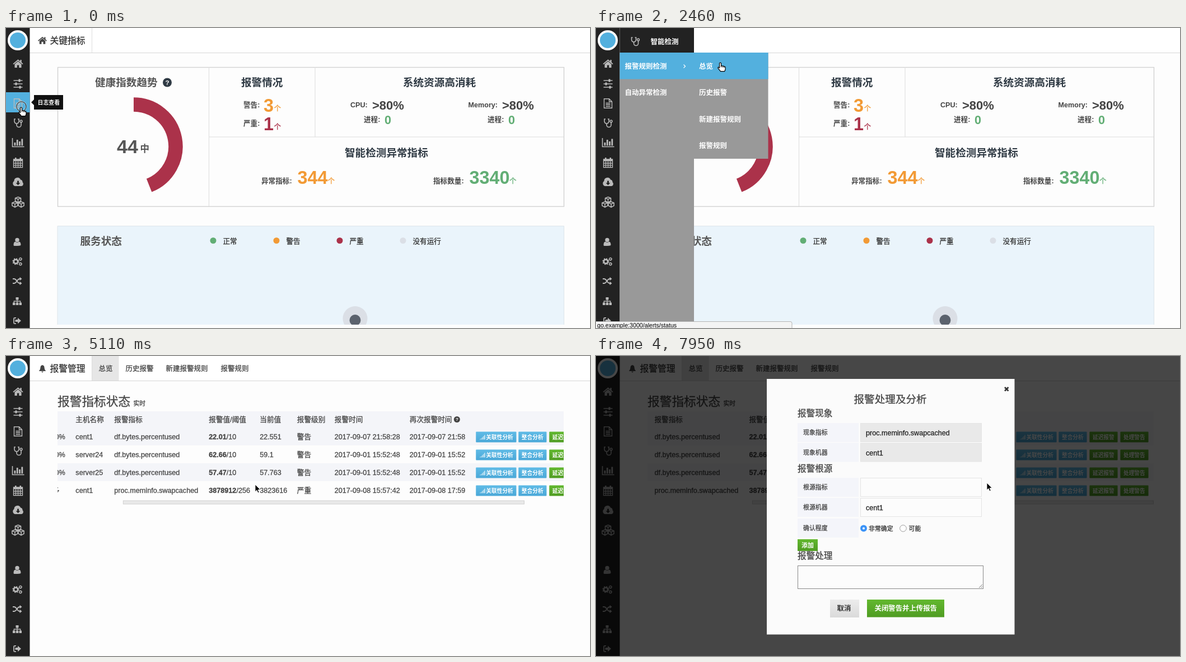
Animation, 1043 px wide and 537 px high, one loop 8 s. Source, as an HTML page:

```html
<!DOCTYPE html>
<html lang="zh-CN">
<head>
<meta charset="utf-8">
<title>报警管理</title>
<style>
html, body { margin: 0; width: 100%; height: 100%; overflow: hidden; background: #fdfdfd; }
svg { display: block; width: 1043px; height: 537px; }
text { font-family: "Liberation Sans", "Noto Sans CJK SC", "Noto Sans CJK", sans-serif; white-space: pre; }
</style>
</head>
<body>
<svg id="stage" viewBox="0 0 1043 537" xmlns="http://www.w3.org/2000/svg"></svg>
<script>
const BLUE = '#53b0de', GREEN = '#62ae75', ORANGE = '#f29a35', RED = '#ab324a', DARK = '#2f3a44', INK = '#444';
const LOOP = 8000, SCROLL = 237, THUMB = 187;

// drawing helpers; text is placed by its left edge and its middle line
const text = (x, y, size, str, fill = INK, weight = 400) =>
  `<text x="${x}" y="${y + size * .37}" font-size="${size}" fill="${fill}" font-weight="${weight}"` +
  `${weight < 700 ? ` stroke="${fill}" stroke-width=".28"` : ''}>${str}</text>`;
const bold = (x, y, size, str, fill = INK) => text(x, y, size, str, fill, 700);
const rect = (x, y, w, h, fill, extra = '') =>
  `<rect x="${x}" y="${y}" width="${w}" height="${h}" fill="${fill}" ${extra}/>`;
const dot = (x, y, r, fill, extra = '') => `<circle cx="${x}" cy="${y}" r="${r}" fill="${fill}" ${extra}/>`;
const fill = d => `<path d="${d}" fill="currentColor"/>`;
const line = (d, w = 1.6) => `<path d="${d}" fill="none" stroke="currentColor" stroke-width="${w}"/>`;
const group = (id, body) => `<g id="${id}">${body}</g>`;
const border = c => `stroke="${c}"`;

const cube = (x, y) =>
  `<g transform="translate(${x} ${y})">${line('M0-5L5-3V2L0 5L-5 2V-3ZM-5-3L0-1L5-3M0-1V5', 1.5)}</g>`;
const cog = (x, y, r) =>
  `<g fill="none" stroke="currentColor"><circle cx="${x}" cy="${y}" r="${r}" stroke-width="${r * .7}"/>` +
  `<circle cx="${x}" cy="${y}" r="${r * 1.45}" stroke-width="${r * .5}" stroke-dasharray="${r * .57}"/></g>`;

const ICONS = {
  home: fill('M0-4.3L6 .8V7H1.7V2.5H-1.7V7H-6V.8ZM3.8-7H6.2V-1L3.8-3Z') + line('M-8.5 .6L0-6.5L8.5 .6', 1.8),
  sliders: line('M-8-6H8M-8 0H8M-8 6H8', 1.7) + fill('M1-8.5H4V-3.5H1ZM-5-2.5H-2V2.5H-5ZM2 3.5H5V8.5H2Z'),
  file: line('M-7-8.2H2L7-3.2V8.2H-7ZM2-8.2V-3.2H7M-4 -.5H4M-4 2.3H4M-4 5.2H4', 1.4),
  scope: line('M-4.5-7H-6.5V-3A4 4 0 0 0 1.5-3V-7H-.5M-2.5 1V3.5A4 4 0 0 0 5.5 3.5V-1') +
    dot(5.5, -3, 1.9, 'none', 'stroke="currentColor" stroke-width="1.5"'),
  chart: line('M-10-8V7.5H11', 1.6) + fill('M-7 5.5V0H-4.2V5.5ZM-2.7 5.5V-5H.1V5.5ZM1.6 5.5V-2H4.4V5.5ZM5.9 5.5V-6.5H8.7V5.5Z'),
  calendar: line('M-8-6H8V8.5H-8ZM-8 1H8M-8 4.7H8M-4-2.5V8M0-2.5V8M4-2.5V8', 1.3) +
    fill('M-8-6H8V-2.5H-8ZM-5.5-9H-3V-5H-5.5ZM3-9H5.5V-5H3Z'),
  cloud: fill('M-5.5 7A5 5 0 0 1-7-2A6 6 0 0 1 4.5-4.5A4 4 0 0 1 8 0A4 4 0 0 1 6 7Z') +
    '<path d="M-1.4-2.5H1.4V1.2H4L0 5.2L-4 1.2H-1.4Z" fill="#222"/>',
  cubes: cube(0, -4.5) + cube(-5.6, 4) + cube(5.6, 4),
  user: dot(0, -3.6, 3.7, 'currentColor') + fill('M-6.5 5.5Q-6.5-.5-3.2-.5Q0 2 3.2-.5Q6.5-.5 6.5 5.5Q6.5 7-5 7Q-6.5 7-6.5 5.5Z'),
  cogs: cog(-2.5, 0, 3.6) + cog(5.8, -4.4, 1.9) + cog(5.8, 4.4, 1.9),
  random: line('M-8-4H-5.5C-1-4 0 4 4.5 4H5M-8 4H-5.5C-1 4 0-4 4.5-4H5', 1.9) + fill('M4.5-7.2L8.5-4L4.5-.8ZM4.5 .8L8.5 4L4.5 7.2Z'),
  tree: fill('M-2.5-7H2.5V-2.5H-2.5ZM-8 2.5H-3.5V7H-8ZM-2.3 2.5H2.3V7H-2.3ZM3.5 2.5H8V7H3.5Z') + line('M0-3V3M-5.7 3V0H5.7V3', 1.3),
  exit: line('M-2-5.2H-4.5Q-6-5.2-6-3.7V3.7Q-6 5.2-4.5 5.2H-2', 1.7) + fill('M-3.5-2H1V-5.2L7 0L1 5.2V2H-3.5Z'),
  bell: fill('M-7 5Q-4 2-4-2Q-4-6 0-7Q4-6 4-2Q4 2 7 5ZM-2 6H2Q1.5 8 0 8T-2 6Z'),
  signal: fill('M-5 4V3H-4V4ZM-3 4V2H-2V4ZM-1 4V0H0V4ZM1 4V-2H2V4ZM3 4V-4H4.2V4Z'),
};
const icon = (name, x, y, color, k = 1) =>
  `<g transform="translate(${x} ${y}) scale(${k})" color="${color}">${ICONS[name]}</g>`;
const help = (x, y, r, color) => dot(x, y, r, color) + bold(x - r * .44, y, r * 1.45, '?', '#fff');

const header = (name, title) =>
  rect(42, 0, 1001, 44, '#fff') + rect(42, 44, 1001, 1, '#d6d6d6') + rect(153, 0, 1, 44, '#ddd') +
  icon(name, 65, 22.5, INK, .88) + text(78.5, 22.5, 15.75, title, '#333');

function dashboard() {
  const frame = c => `stroke="${c}" fill="none"`;
  const stat = (x, y, label, nx, size, num, color, unit) =>
    bold(x, y[0], 12.6, label) + bold(nx, y[1], size, num, color) + (unit ? text(unit, y[0] + 6, 12.6, '个', color) : '');
  const legend = [['正常', GREEN], ['警告', ORANGE], ['严重', RED], ['没有运行', '#dbdfe6']];
  return header('home', '关键指标') +
    rect(92.5, 70.5, 904, 249, '#fdfdfd', 'stroke="#d2d2d2" stroke-width="1.4"') +
    `<path d="M362.5 70V319M552 70V195M362.5 195H996" ${frame('#ddd')}/>` +
    bold(159, 97.5, 18.6, '健康指数趋势', '#555') + help(288, 97.5, 8, DARK) +
    `<path d="M228 137A75 75 0 0 1 255.6 281.7" fill="none" stroke="${RED}" stroke-width="25.5"/>` +
    bold(198, 211, 34, '44', '#555') + bold(239.5, 216, 16.5, '中', '#555') +
    bold(420, 97.5, 18.6, '报警情况', DARK) + bold(709, 97.5, 18.6, '系统资源高消耗', DARK) +
    bold(605, 223, 18.6, '智能检测异常指标', DARK) +
    stat(424, [137, 138], '警告:', 460, 32.4, '3', ORANGE, 478.5) +
    stat(424, [170.5, 171], '严重:', 460, 32.4, '1', RED, 478.5) +
    stat(615, [137, 138], 'CPU:', 654, 22, '&gt;80%') +
    stat(825.5, [137, 138], 'Memory:', 886, 22, '&gt;80%') +
    stat(639, [163.5, 164], '进程:', 676, 21.6, '0', GREEN) +
    stat(860, [163.5, 164], '进程:', 897, 21.6, '0', GREEN) +
    stat(456, [273.5, 267.5], '异常指标:', 520.5, 32.4, '344', ORANGE) + text(574.5, 273.5, 12.6, '个', ORANGE) +
    stat(763, [273.5, 267.5], '指标数量:', 827.5, 32.4, '3340', GREEN) + text(899, 273.5, 12.6, '个', GREEN) +
    rect(92, 354, 904.5, 177, '#eaf4fb') + `<path d="M92 531V354.5H996.5V531" ${frame('#dde5ea')}/>` +
    bold(132.5, 381, 18.6, '服务状态', '#555') +
    legend.map(([s, c], i) => dot(370 + i * 113, 380.5, 5.5, c) + text(387.5 + i * 113, 381, 12.6, s, '#333')).join('') +
    `<g clip-path="url(#panel)">${dot(623.5, 520, 22, '#dbdfe6')}${dot(623.5, 523, 10, '#5b626d')}</g>`;
}

function table() {
  const cols = [272.5, 341.5, 510.5, 601.5, 668, 735, 869];
  const heads = ['主机名称', '报警指标', '报警值/阈值', '当前值', '报警级别', '报警时间', '再次报警时间'];
  const disk = '磁盘空间 &lt; 10%', df = 'df.bytes.percentused';
  const rows = [
    [disk, 'cent1', df, '22.01', '10', '22.551', '警告', '2017-09-07 21:58', ':28', '2017-09-07 21:58'],
    [disk, 'server24', df, '62.66', '10', '59.1', '警告', '2017-09-01 15:52', ':48', '2017-09-01 15:52'],
    [disk, 'server25', df, '57.47', '10', '57.763', '警告', '2017-09-01 15:52', ':48', '2017-09-01 15:52'],
    ['内存swap太多', 'cent1', 'proc.meminfo.swapcached', '3878912', '256', '3823616', '严重', '2017-09-08 15:57', ':42', '2017-09-08 17:59'],
  ];
  const buttons = [[987, 73, '关联性分析', 'blue', 19], [1063, 51, '整合分析', 'blue', 6.5],
    [1118, 51, '延迟报警', 'green', 6.5], [1173, 51, '处理警告', 'green', 6.5]];
  const row = (r, i) => {
    const y = 144.5 + i * 32;
    const [rule, host, metric, val, max, now, level, day, sec, again] = r;
    const cells = [host, metric, `<tspan font-weight="700">${val}</tspan>/${max}`, now, level, day + sec, again];
    return icon('bell', 107, y, i < 3 ? '#f4b53f' : '#d2473d', .8) +
      text(123.5, y, 12.6, '系统：') + text(164, y, 12.6, rule) +
      cells.map((c, n) => text(cols[n], y, 12.6, c)).join('') +
      buttons.map(([x, w, s, c, pad]) =>
        rect(x + .4, y - 9, w - .8, 19, `url(#${c})`, 'rx="1"') + bold(x + pad - .5, y + .7, 9.7, s, '#fff')).join('') +
      icon('signal', 999.5, y + 1, '#fff');
  };
  const stripes = rect(92, 99, 904, 61, '#f4f5f9') + rect(92, 192, 904, 32, '#f4f5f9');
  return stripes + '<g clip-path="url(#table)">' + group('rows',
    text(100.5, 113, 12.6, '规则清楚') +
    heads.map((h, i) => text(cols[i], 113, 12.6, h)).join('') + help(953.5, 113.5, 5.5, INK) +
    rows.map(row).join('')) + '</g>' +
    rect(92.5, 259, 716, 6, '#e9e9e9', 'id="thumb" stroke="#cfcfcf"');
}

const alerts = () => header('bell', '报警管理') + rect(154, 0, 47.5, 44, '#e6e6e6') +
  ['总览', '历史报警', '新建报警规则', '报警规则'].map((s, i) => text([165.5, 213.5, 285.5, 383.5][i], 22.5, 12.5, s)).join('') +
  text(92, 81, 21.7, '报警指标状态') + text(227.5, 85.5, 10.8, '实时') + group('table', table());

function sidebar() {
  const names = Object.keys(ICONS).slice(0, 13);
  const ys = [64, 100, 135, 170, 205, 241, 276, 312, 383, 418, 453, 489, 524];
  return rect(0, 0, 42.5, 537, '#222') + rect(0, 115, 42.5, 36, BLUE, 'id="tile"') +
    dot(21, 22, 18, '#fff') + dot(21, 22, 14, BLUE) +
    names.map((n, i) => icon(n, i < 8 ? 21.5 : 20, ys[i], '#bbb')).join('');
}

const tip = '<path d="M50 120H102V146H50V138L45 133L50 128Z" fill="#111"/>' +
  '<text id="tipText" x="56.5" y="136.7" font-size="9.9" font-weight="700" fill="#fff"></text>';

const menu = () => rect(42.5, 0, 132.5, 44, '#222') + rect(42.5, 44, 132.5, 493, '#999') +
  rect(42.5, 44, 132.5, 47.5, BLUE, 'id="item"') + icon('scope', 70, 24, '#bbb') +
  bold(97.5, 24.5, 12.5, '智能检测', '#fff') + bold(51.5, 68, 12.5, '报警规则检测', '#fff') +
  bold(51.5, 115.5, 12.5, '自动异常检测', '#fff') +
  '<path d="M156.5 65.5L159.5 68.5L156.5 71.5" fill="none" stroke="#fff" stroke-width="1.2"/>' +
  group('sub', rect(175, 44, 132.5, 190, '#999') + rect(175, 44, 132.5, 47.5, BLUE, 'id="subItem"') +
    ['总览', '历史报警', '新建报警规则', '报警规则'].map((s, i) => bold(184, 68 + i * 47.5, 12.5, s, '#fff')).join(''));

const status = '<path d="M-1 538V525.5H347Q350 525.5 350 528.5V538Z" fill="#f4f4f4" stroke="#b5b5b5"/>' +
  '<text id="url" x="2" y="536" font-size="10.66" fill="#000"></text>';

function modal() {
  const field = (y, label, val, bg) => rect(360, y, 109, 34, '#f4f5fa') + text(370, y + 17, 10.9, label) +
    (bg ? rect(472.5, y + .5, 216, 33, bg, border('#e4e4e4')) + text(482, y + 17.5, 12.6, val, '#222') : '');
  return rect(0, 0, 1043, 537, '#000', 'opacity=".72"') + rect(305, 41, 442.5, 457.5, '#fbfbfb') +
    '<path d="M730 56L736.5 62.5M736.5 56L730 62.5" stroke="#333" stroke-width="2.6"/>' +
    text(460.5, 77.5, 18.6, '报警处理及分析') + text(360, 102.5, 15.6, '报警现象') +
    field(120, '现象指标', 'proc.meminfo.swapcached', '#e9e9e9') + field(155.5, '现象机器', 'cent1', '#e9e9e9') +
    text(360, 201, 15.6, '报警根源') + field(218, '根源指标', '', '#fcfcfc') + field(254, '根源机器', 'cent1', '#fcfcfc') +
    field(291, '确认程度') + dot(478, 308.5, 6, '#3b93f7') + dot(478, 308.5, 2, '#fff') +
    text(487, 308.5, 10.9, '非常确定', '#333') + dot(548.5, 308.5, 5.8, '#fff', border('#999')) + text(558.5, 308.5, 10.9, '可能', '#333') +
    rect(360, 328, 36, 21, 'url(#green)') + bold(367, 338.5, 10.9, '添加', '#fff') +
    text(360, 357.5, 15.6, '报警处理') + rect(360.5, 375.5, 331, 41, '#fcfcfc', border('#888')) +
    '<path d="M684 415L690 409M687.5 415L690 412.5" stroke="#777"/>' +
    rect(418, 436, 52, 32, 'url(#grey)') + bold(430.5, 451.5, 12.4, '取消', '#333') +
    rect(484, 436, 138, 31.5, 'url(#green)') + bold(497.5, 451.5, 12.4, '关闭警告并上传报告', '#fff');
}

const cursor = group('ring', dot(.5, -1.5, 8.6, 'none', 'stroke="#fff" stroke-width="2.6" opacity=".6"') +
    dot(.5, -1.5, 8.6, 'none', 'stroke="#222" stroke-width="1.2"')) +
  group('arrow', '<path d="M0 0V13L3 10.3L5 15L7.2 14L5.2 9.5H9.3Z" fill="#000" stroke="#fff" stroke-width=".9"/>') +
  group('hand', '<path d="M-1.5 1Q0-1 1.5 1V6Q3 5 4.5 6.3Q6 5.7 7.1 7.1Q9 6.8 9 8.6V11.6Q9 13.6 7.5 15.6H.5L-3.5 10.6Q-5 8.6-3.3 8Q-2.1 8-1.5 10Z" fill="#fff" stroke="#000" stroke-width="1.2"/>' +
    '<path d="M1.5 6V8.5M4.5 6.3V8.8M7 7.1V9" stroke="#000"/>');

const grad = (id, a, b) => `<linearGradient id="${id}" x2="0" y2="1"><stop stop-color="${a}"/><stop offset="1" stop-color="${b}"/></linearGradient>`;
const stage = document.getElementById('stage');
stage.innerHTML = '<defs>' + grad('blue', '#5fbbe6', '#4aa8d8') + grad('green', '#62b82f', '#4f9c22') + grad('grey', '#ececec', '#dadada') +
  `<clipPath id="table">${rect(92, 99, 904, 170, '#000')}</clipPath><clipPath id="panel">${rect(92, 354, 904, 177, '#000')}</clipPath></defs>` +
  rect(0, 0, 1043, 537, '#fdfdfd') + group('dash', dashboard()) + group('alerts', alerts()) + sidebar() +
  group('tip', tip) + group('menu', menu()) + group('status', status) + group('modal', modal()) + group('cursor', cursor);

const el = {};
stage.querySelectorAll('g[id], rect[id], text[id]').forEach(e => el[e.id] = e);

// pointer stops: time, x, y
const PATH = [
  [0, 27, 142], [400, 27, 142], [890, 27, 171], [1690, 27, 171], [1790, 83, 100], [2000, 110, 68], [2300, 222, 62],
  [2840, 222, 62], [3280, 404, 177], [3330, 404, 177], [3420, 376, 185], [3589, 376, 185], [3590, 288, 270],
  [4180, 288, 270], [4340, 445, 230], [5450, 445, 230], [5890, 800, 237], [5980, 800, 237], [6250, 948, 243],
  [6450, 956, 241], [7319, 956, 241], [7320, 952, 242], [7810, 952, 242], [7950, 698, 227], [LOOP, 698, 227],
];
const CLICKS = [[0, 50], [1370, 1400], [4580, 4600], [7260, 7320]];
const URLS = ['go.example:3000/alerts/status', 'go.example:3000/alerts/association/.../2.2.proc.meminfo.swapcached'];

const clamp = v => Math.min(1, Math.max(0, v));
const ease = v => v * v * (3 - 2 * v);
const within = (t, a, b) => t >= a && t < b;
const show = (e, on) => e.style.display = on ? '' : 'none';
const shift = (e, x, y = 0) => e.setAttribute('transform', `translate(${x} ${y})`);

function pointer(t) {
  const i = PATH.findIndex(p => p[0] > t);
  const [t0, x0, y0] = PATH[i - 1], [t1, x1, y1] = PATH[i];
  const k = ease((t - t0) / (t1 - t0));
  return [x0 + (x1 - x0) * k, y0 + (y1 - y0) * k];
}

function draw(t) {
  const [x, y] = pointer(t);
  const first = t < 2520, open = first && t >= 1370;
  show(el.dash, first);
  show(el.alerts, !first);
  show(el.table, t >= 2960);

  const onSide = first && x < 42, low = y > 151;
  show(el.tile, onSide);
  el.tile.setAttribute('y', low ? 150.5 : 115);
  show(el.tip, onSide && !open);
  shift(el.tip, 0, low ? 35 : 0);
  el.tipText.textContent = low ? '智能检测' : '日志查看';

  const top = y < 91, nested = open && top && t > 1790;
  show(el.menu, open);
  el.menu.setAttribute('opacity', t < 1400 ? .7 : 1);
  show(el.item, open && x > 42 && y < 139);
  el.item.setAttribute('y', top ? 44 : 91.5);
  show(el.sub, nested);
  show(el.subItem, x > 175);

  const second = t > 5000;
  show(el.status, (nested && x > 175) || within(t, 2520, 3380) || (second && x > 750 && t < 6350));
  el.url.textContent = URLS[+second];

  const k = ease(clamp((t - 5000) / 190));
  shift(el.rows, -SCROLL * k);
  shift(el.thumb, THUMB * k);

  show(el.modal, t >= 7320);
  el.modal.setAttribute('opacity', t < 7380 ? .5 : 1);

  const hand = first || (second && x > 750 && t < 7320);
  show(el.hand, hand);
  show(el.arrow, !hand);
  show(el.ring, CLICKS.some(c => within(t, ...c)));
  shift(el.cursor, x, y);
}

const start = performance.now();
function tick(now) {
  draw(Math.max(0, now - start) % LOOP);
  requestAnimationFrame(tick);
}
draw(0);
requestAnimationFrame(tick);
</script>
</body>
</html>
```
